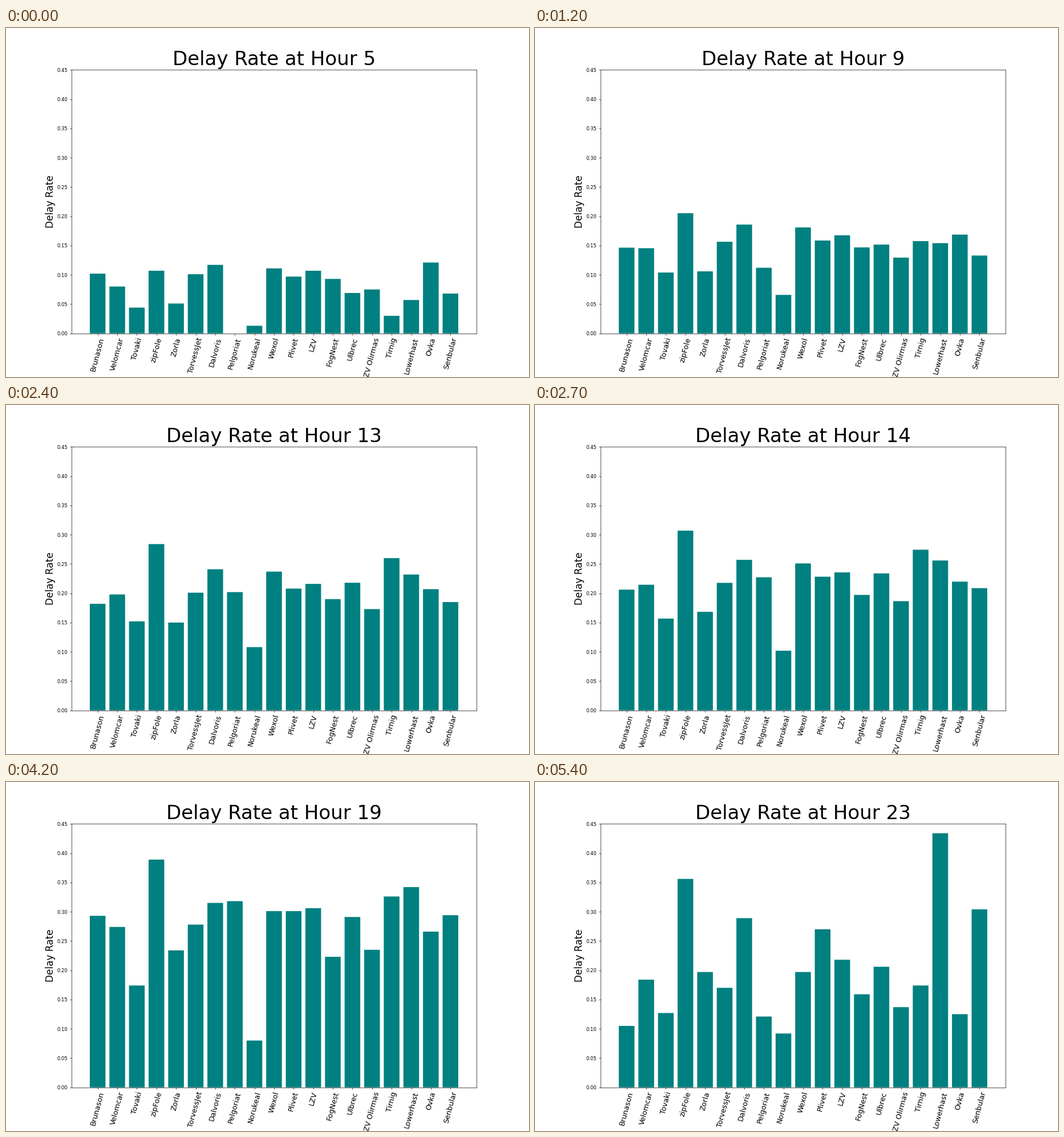
Animation, 917 px wide and 611 px high, one loop 5.7 s. Source, as a matplotlib script:

```python
import numpy as np
import matplotlib.pyplot as plt
from matplotlib.animation import FuncAnimation

WIDTH, HEIGHT, DPI = 917, 611, 61.13
STEP_MS = 300
HOURS = range(5, 24)

# Rates in thousandths at dawn, midday, evening and night.
TURNS = (5, 13, 19, 23)
RATES = {
    "Brunason": (102, 182, 293, 105),
    "Velomcar": (80, 198, 274, 184),
    "Tovaki": (44, 152, 174, 127),
    "zipFole": (107, 284, 389, 356),
    "Zorla": (51, 150, 234, 197),
    "TorvessJet": (101, 201, 278, 170),
    "Dalvoris": (117, 241, 315, 289),
    "Pelgoriat": (0, 202, 318, 121),
    "Norukeal": (13, 108, 80, 92),
    "Wexol": (111, 237, 301, 197),
    "Plivet": (97, 208, 301, 270),
    "LZV": (107, 216, 306, 218),
    "FogNest": (93, 190, 223, 159),
    "Ulbrec": (69, 218, 291, 206),
    "ZV Olirmas": (75, 173, 235, 137),
    "Tirnig": (30, 260, 326, 174),
    "Lowerhast": (57, 232, 342, 434),
    "Ovka": (121, 207, 266, 125),
    "Senbular": (68, 185, 294, 304),
}
# Rates climb a little early in the day and change late in the evening.
EASING = (0.85, 0.85, 2)


def rate_at(hour, values):
    """Ease between the two turning points around the hour."""
    i = min(np.searchsorted(TURNS, hour, side="right"), len(TURNS) - 1) - 1
    u = (hour - TURNS[i]) / (TURNS[i + 1] - TURNS[i])
    return (values[i] + (values[i + 1] - values[i]) * u ** EASING[i]) / 1000


plt.rcParams["font.family"] = "DejaVu Sans"
# the tiny surplus guards against rounding down to a smaller pixel size
fig, ax = plt.subplots(
    figsize=((WIDTH + 1e-3) / DPI, (HEIGHT + 1e-3) / DPI), dpi=DPI)
fig.subplots_adjust(left=0.125, right=0.9, bottom=0.125, top=0.88)

x = np.arange(len(RATES))
bars = ax.bar(x, 0, width=0.8, color="teal", snap=False)
ax.set_xlim(-1.34, len(RATES) + 0.34)
ax.set_ylim(0, 0.45)
ax.set_yticks(np.arange(10) * 0.05)
ax.yaxis.set_major_formatter("{x:.2f}")
ax.set_xticks(x, list(RATES), rotation=75, fontsize=15)
ax.set_ylabel("Delay Rate", fontsize=20, labelpad=2.9)
title = ax.set_title("", fontsize=40, y=1, pad=10.3)


def update(hour):
    title.set_text(f"Delay Rate at Hour {hour}")
    for bar, values in zip(bars, RATES.values()):
        bar.set_height(rate_at(hour, values))
    return [title, *bars]


anim = FuncAnimation(fig, update, frames=HOURS, interval=STEP_MS,
                     repeat=True, repeat_delay=0, blit=False)
plt.show()
```
